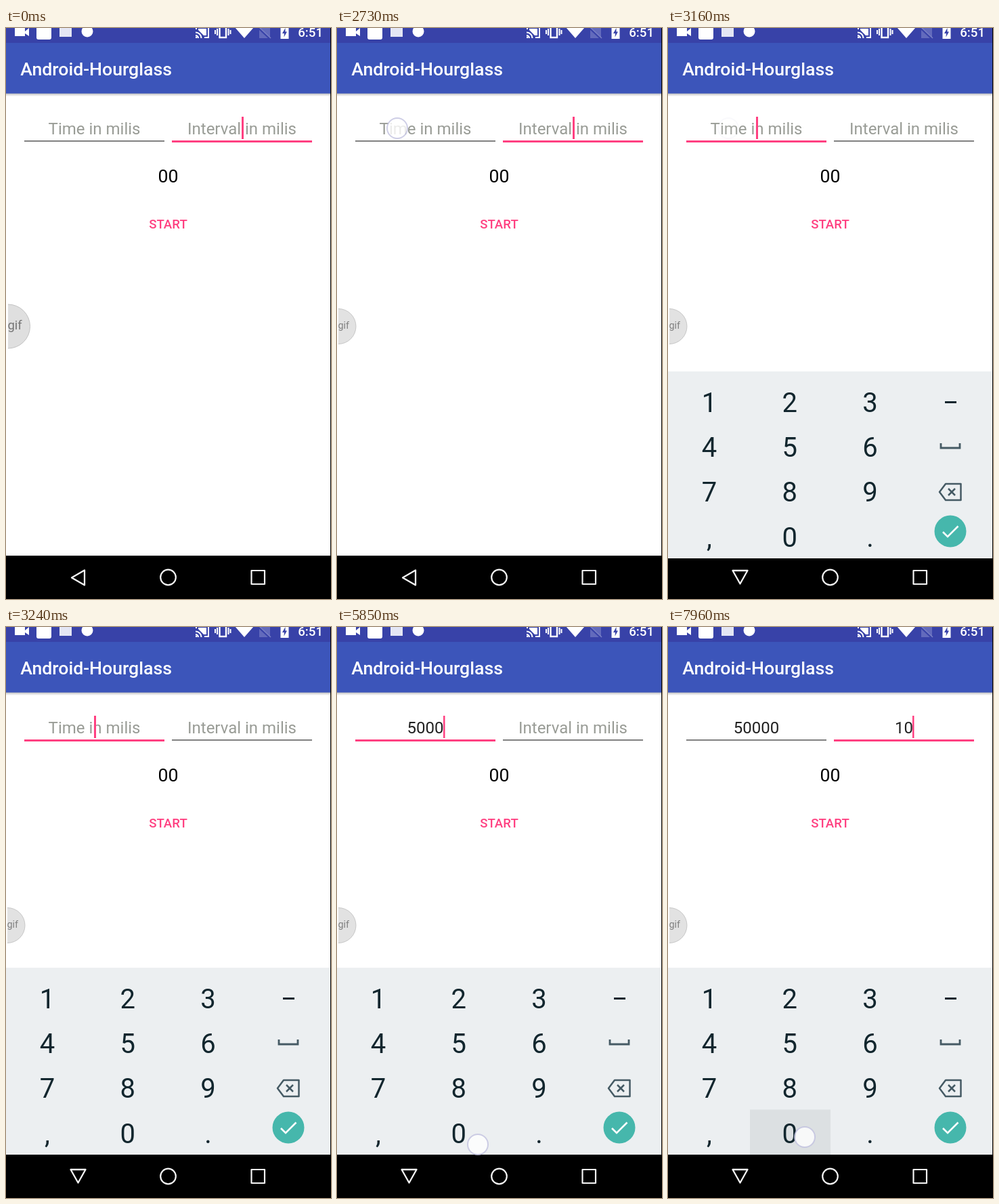
These frames come from a looping animation (480x843 px, 8 s). An HTML page with a canvas:

```html
<!DOCTYPE html>
<html lang="en">
<head>
<meta charset="utf-8">
<title>Android-Hourglass</title>
<style>
html, body { margin: 0; width: 100%; height: 100%; overflow: hidden; background: #fff; }
canvas { display: block; width: 480px; height: 843px; }
</style>
</head>
<body>
<canvas id="stage" width="480" height="843"></canvas>
<script>
const LOOP = 8000;
const PINK = '#ff4081', INK = '#12262e', ICON = '#455a64';
const KB_TOP = 503, KB_HEIGHT = 276, KB_START = 3015;
const screenCtx = document.getElementById('stage').getContext('2d');
const kbCanvas = document.createElement('canvas');
kbCanvas.width = 480;
kbCanvas.height = KB_HEIGHT;
const kbCtx = kbCanvas.getContext('2d');

// lit: [from, to] of the key highlight, cell: [column, row]
const taps = [
  { x: 89, y: 148, down: 2730, up: 2900, fade: 300 },
  { x: 200, y: 615, down: 4350, up: 4490, fade: 130, cell: [1, 1], lit: [4380, 4510] },
  { x: 200, y: 770, down: 4850, up: 4960, fade: 110, cell: [1, 3], lit: [4880, 4980] },
  { x: 204, y: 775, down: 5170, up: 5270, fade: 110, cell: [1, 3], lit: [5200, 5290] },
  { x: 205, y: 775, down: 5550, up: 5600, fade: 70 },
  { x: 208, y: 764, down: 5850, up: 6050, fade: 230, cell: [1, 3], lit: [5950, 6070] },
  { x: 322, y: 142, down: 6500, up: 6600, fade: 210 },
  { x: 72, y: 556, down: 7310, up: 7450, fade: 150, cell: [0, 0], lit: [7340, 7490] },
  { x: 202, y: 753, down: 7810, up: 7990, fade: 130, cell: [1, 3], lit: [7850, 8000] }
];
const fields = [
  { left: 27, mid: 130.5, hint: 'Time in milis', digits: '50000', times: [4490, 4960, 5270, 5570, 6050] },
  { left: 245, mid: 348.5, hint: 'Interval in milis', digits: '10', times: [7470, 7950] }
];
const caretOff = [[80, 550], [1040, 1520], [2020, 2500], [3410, 3920], [4420, 4490], [7070, 7470]];

const clamp = v => Math.max(0, Math.min(1, v));
const within = (t, [from, to]) => t >= from && t < to;

function rect(c, x, y, w, h, fill) {
  c.fillStyle = fill;
  c.fillRect(x, y, w, h);
}

function path(c, points, closed) {
  c.beginPath();
  for (let i = 0; i < points.length; i += 2) c.lineTo(points[i], points[i + 1]);
  if (closed) c.closePath();
}

function line(c, points, color, width, closed) {
  path(c, points, closed);
  c.strokeStyle = color;
  c.lineWidth = width;
  c.stroke();
}

function poly(c, points, fill) {
  path(c, points, true);
  c.fillStyle = fill;
  c.fill();
}

function disc(c, x, y, r, fill, stroke, width) {
  c.beginPath();
  c.arc(x, y, r, 0, Math.PI * 2);
  if (fill) { c.fillStyle = fill; c.fill(); }
  if (stroke) { c.strokeStyle = stroke; c.lineWidth = width; c.stroke(); }
}

function label(c, str, x, y, size, color, align = 'center', weight = 400) {
  c.font = `${weight} ${size}px Roboto, "Noto Sans", sans-serif`;
  c.textAlign = align;
  c.fillStyle = color;
  c.fillText(str, x, y);
}

function drawStatusBar(c) {
  rect(c, 0, 0, 480, 22, '#3842a8');
  // camera
  rect(c, 13, 0, 15, 12, '#fff');
  poly(c, [28, 5, 34, 0, 34, 12, 28, 8], '#fff');
  c.beginPath();
  c.roundRect(45, -4, 22, 21, 3);
  c.fill();
  rect(c, 79, -4, 18, 17, '#e4e6f4');
  disc(c, 120, 5, 8.5, '#fff');
  // cast
  line(c, [281, 2, 281, -2, 299, -2, 299, 14, 293, 14], '#fff', 2);
  poly(c, [284, 1, 296, 1, 296, 11, 292, 11, 284, 3], '#fff');
  for (const r of [4, 8.5]) {
    c.beginPath();
    c.arc(280, 15, r, -Math.PI / 2, 0);
    c.stroke();
  }
  rect(c, 280, 12.5, 2.5, 2.5, '#fff');
  // vibrate
  c.lineWidth = 2.4;
  c.strokeRect(315.5, -4, 9.5, 18);
  for (const [x, h] of [[312, 5], [309, 3], [328.5, 5], [331.5, 3]]) rect(c, x - 1, 6 - h, 2, h * 2, '#fff');
  // wifi, SIM, battery
  poly(c, [338, -1, 352, 15, 366, -1], '#fff');
  poly(c, [377, -2, 390, -2, 390, 15, 374, 15, 374, 2], '#626abc');
  line(c, [372, -1, 390, 16], '#3842a8', 3);
  line(c, [373, -2, 391, 15], '#7a81c6', 1.5);
  rect(c, 405.5, -2, 12, 18, '#fff');
  poly(c, [412.5, 0, 408, 8, 411, 8, 410.5, 13.5, 415, 5.5, 412.5, 5.5], '#3842a8');
  label(c, '6:51', 468, 13, 18.67, '#fff', 'right', 500);
}

function drawAppBar(c) {
  const shade = c.createLinearGradient(0, 96, 0, 101);
  shade.addColorStop(0, 'rgba(0,0,0,.28)');
  shade.addColorStop(1, 'rgba(0,0,0,0)');
  rect(c, 0, 96, 480, 5, shade);
  rect(c, 0, 22, 480, 74.67, '#3c55ba');
  label(c, 'Android-Hourglass', 21.3, 70, 26.67, '#fff', 'left', 500);
}

function drawField(c, f, focused, t) {
  const value = f.digits.slice(0, f.times.filter(s => t >= s).length);
  label(c, value || f.hint, f.mid, 157.3, 24, value ? '#212121' : '#999c96');
  if (focused) rect(c, f.left, 166, 207, 3, PINK);
  else rect(c, f.left, 166, 207, 1.8, '#747474');
  if (focused && !caretOff.some(s => within(t, s))) {
    const half = value ? c.measureText(value).width / 2 : 0;
    rect(c, Math.round(f.mid + half - 0.6), 131, value ? 2.5 : 3, 33, PINK);
  }
}

function drawBubble(c, t) {
  const k = t < 80 ? 1 : t < 170 ? 0.45 : 0;
  c.save();
  c.beginPath();
  c.rect(2 + k, 400, 60, 80);
  c.clip();
  c.globalAlpha = t < 420 ? 1 : t < 550 ? 0.95 : 0.9;
  disc(c, 2 + k, 440.5, 26 + 6.5 * k, '#dfdfdf', '#c2c2c2', 1);
  label(c, 'gif', 1.4 + k, 444 + k, 14.5 + 4 * k, '#777', 'left');
  c.restore();
}

function drawKeys(t) {
  const c = kbCtx;
  c.setTransform(1, 0, 0, 1, 0, -KB_TOP);
  rect(c, 0, KB_TOP, 480, KB_HEIGHT, '#eceff1');
  for (const { cell, lit } of taps) {
    if (lit && within(t, lit)) rect(c, 2 + cell[0] * 119, 513 + cell[1] * 66.5, 119, 66.5, '#dce0e2');
  }
  [...'123456789,0.'].forEach((ch, i) =>
    label(c, ch, 61 + (i % 3) * 118.7, 563 + Math.floor(i / 3) * 66.2, 40, INK));
  rect(c, 409, 547, 17, 3, INK);
  line(c, [403, 609, 403, 616, 431, 616, 431, 609], ICON, 2.8);
  c.lineJoin = 'round';
  line(c, [401, 681, 410, 669, 432.5, 669, 432.5, 693, 410, 693], ICON, 2.5, true);
  line(c, [414, 676, 424, 686], ICON, 2.5);
  line(c, [424, 676, 414, 686], ICON, 2.5);
  c.lineJoin = 'miter';
  disc(c, 417, 739, 23.5, '#46b7ac');
  line(c, [406, 740, 413, 747, 428.5, 731.5], '#fff', 2.6);
}

function drawKeyboard(c, t) {
  if (t < KB_START - 12) return;
  const p = clamp((t - KB_START) / 200);
  drawKeys(t);
  c.globalAlpha = clamp(0.59 + (t - KB_START) / 220);
  c.drawImage(kbCanvas, 0, KB_TOP + Math.round(56 * (1 - p) ** 2));
  c.globalAlpha = 1;
}

function drawNavIcons(c, t) {
  const back = t < 2960 ? [116, 800.5, 116, 822.5, 97, 811.5] : [95.5, 801, 117.5, 801, 106.5, 820.5];
  c.lineJoin = 'round';
  line(c, back, '#f4f4f4', 2.3, true);
  disc(c, 239.5, 811, 11.3, null, '#f4f4f4', 2.2);
  line(c, [362.5, 801, 382, 801, 382, 821, 362.5, 821], '#f4f4f4', 2.2, true);
  c.lineJoin = 'miter';
}

function drawTap(c, tap, t) {
  if (t < tap.down) return;
  const alpha = 1 - clamp((t - tap.up) / tap.fade);
  if (!alpha) return;
  c.globalAlpha = alpha;
  disc(c, tap.x, tap.y, 15, 'rgba(255,255,255,.8)', 'rgba(190,190,222,.75)', 2);
  c.globalAlpha = 1;
}

function draw(t) {
  const c = screenCtx;
  rect(c, 0, 0, 480, 843, '#fff');
  drawStatusBar(c);
  drawAppBar(c);
  const active = t >= 2910 && t < 6580 ? 0 : 1;
  fields.forEach((f, i) => drawField(c, f, i === active, t));
  label(c, '00', 239.5, 228.3, 26.67, '#000');
  label(c, 'START', 239.5, 296.3, 18.67, PINK, 'center', 500);
  rect(c, 0, 779, 480, 64, '#000');
  drawKeyboard(c, t);
  drawNavIcons(c, t);
  drawBubble(c, t);
  taps.forEach(tap => drawTap(c, tap, t));
  rect(c, 479, 0, 1, 843, '#000');
}

const start = performance.now();
function frame() {
  draw((performance.now() - start) % LOOP);
  requestAnimationFrame(frame);
}
frame();
</script>
</body>
</html>
```
